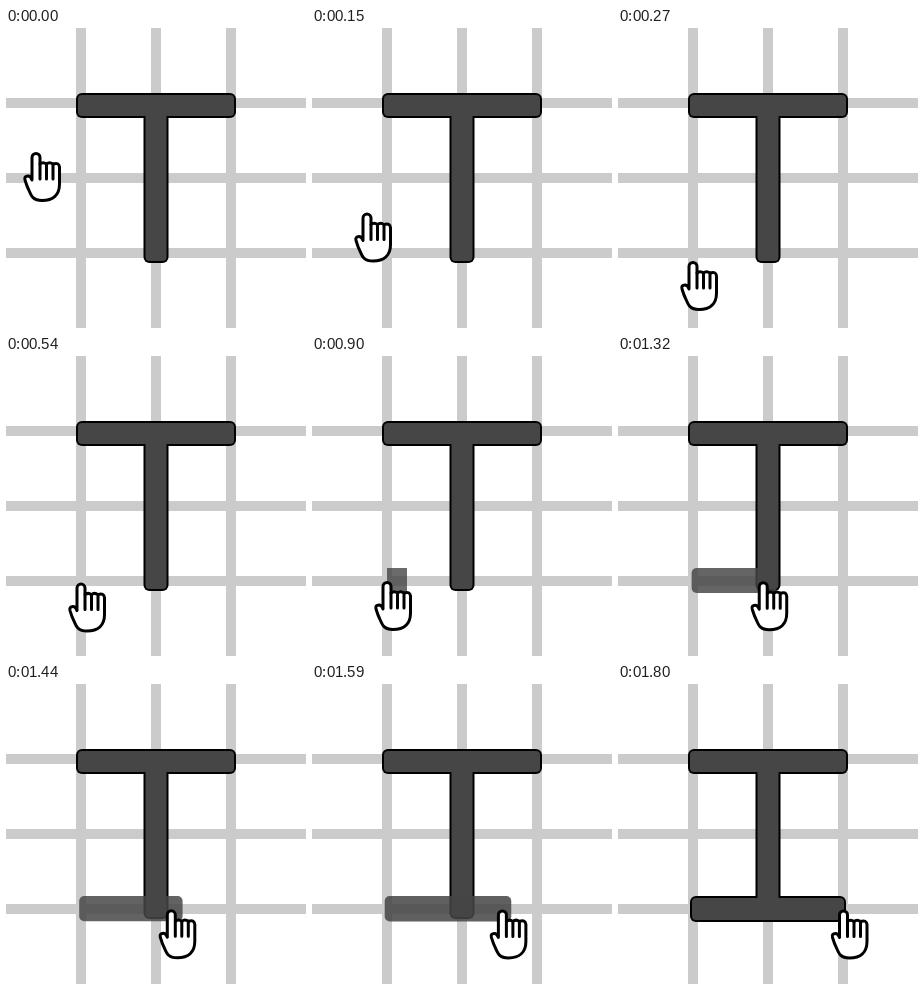
Recreate the animation shown at these times as an HTML page with a canvas. Size 300 by 300 pixels, loop 2700 ms.

```html
<!DOCTYPE html>
<html lang="en">
<head>
<meta charset="utf-8">
<title>Drawing a bar on a grid</title>
<style>
  html, body { margin: 0; width: 100%; height: 100%; overflow: hidden; background: #fff; }
  canvas { display: block; width: 300px; height: 300px; }
</style>
</head>
<body>
<canvas id="stage" width="300" height="300"></canvas>
<script>
const ctx = document.getElementById('stage').getContext('2d');
const LOOP = 2700, STEP = 30;
const PRESS = 570, DRAG = 900, DROP = 1800;
const DARK = '#464646';

const topBar = [70, 65, 230, 90];
const stem = [137.5, 65, 162.5, 235];
const bottomBar = [72, 212, 228, 238];

const palm = new Path2D('M-4 28V5.5a4 4 0 0 1 8 0V12q3-2.5 6.5 0q3-2.5 6.5 0q6-2 6.5 3V32' +
  'C23.5 43 17 48.5 6 48.5S-5 42-9 34l-2-6q-1-4 3-4 2.5 0 4 4Z');
const fingers = new Path2D('M4 12V27M10.5 12V27M17 12V27');

// Timed fingertip positions: [ms, x, y]
const handPath = [
  [0, 30, 124], [270, 75, 233], [300, 75, 233],
  [600, 75, 225], [DRAG, 75, 225], [DROP, 225.5, 225.5]
];

const mix = (a, b, p) => a + (b - a) * p;

function handAt(t) {
  const i = handPath.findIndex(key => key[0] > t);
  if (i < 0) return handPath[handPath.length - 1].slice(1);
  const [t0, x0, y0] = handPath[i - 1], [t1, x1, y1] = handPath[i];
  const p = (t - t0) / (t1 - t0);
  return [mix(x0, x1, p), mix(y0, y1, p)];
}

function box([x0, y0, x1, y1], color, radius, inset = 0) {
  ctx.fillStyle = color;
  ctx.beginPath();
  ctx.roundRect(x0 + inset, y0 + inset, x1 - x0 - 2 * inset, y1 - y0 - 2 * inset, radius);
  ctx.fill();
}

function drawGrid() {
  ctx.fillStyle = '#fff';
  ctx.fillRect(0, 0, 300, 300);
  ctx.fillStyle = '#cbcbcb';
  for (const c of [75, 150, 225]) {
    ctx.fillRect(c - 5, 0, 10, 300);
    ctx.fillRect(0, c - 5, 300, 10);
  }
}

// All outlines first, then all fills, so the bars merge
function drawBars(bars) {
  bars.forEach(bar => box(bar, '#000', 6));
  bars.forEach(bar => box(bar, DARK, 4, 2));
}

function drawGhost(p) {
  ctx.globalAlpha = mix(0.8, 0.87, p);
  box([mix(75, 72, p), 212, mix(95, 231, p), mix(236, 238, p)], DARK, Math.min(5, p * 12));
  ctx.globalAlpha = 1;
}

function drawPress(t) {
  ctx.globalAlpha = t < PRESS + STEP ? 0.25 : 0.5;
  ctx.fillStyle = DARK;
  ctx.beginPath();
  ctx.arc(75, 225, 16.5, 0, Math.PI * 2);
  ctx.fill();
  ctx.globalAlpha = 1;
}

function drawHand(x, y) {
  ctx.save();
  ctx.translate(x, y);
  ctx.lineWidth = 3;
  ctx.lineJoin = ctx.lineCap = 'round';
  ctx.strokeStyle = '#000';
  ctx.fillStyle = '#fff';
  ctx.fill(palm);
  ctx.stroke(palm);
  ctx.stroke(fingers);
  ctx.restore();
}

function draw(now) {
  const t = Math.floor(now % LOOP / STEP) * STEP;
  drawGrid();
  drawBars(t < DROP ? [topBar, stem] : [topBar, stem, bottomBar]);
  if (t >= PRESS && t < DRAG) drawPress(t);
  if (t >= DRAG && t < DROP) drawGhost((t - DRAG) / (DROP - DRAG));
  drawHand(...handAt(t));
}

let start;
function tick(now) {
  start ??= now;
  draw(now - start);
  requestAnimationFrame(tick);
}
draw(0);
requestAnimationFrame(tick);
</script>
</body>
</html>
```
